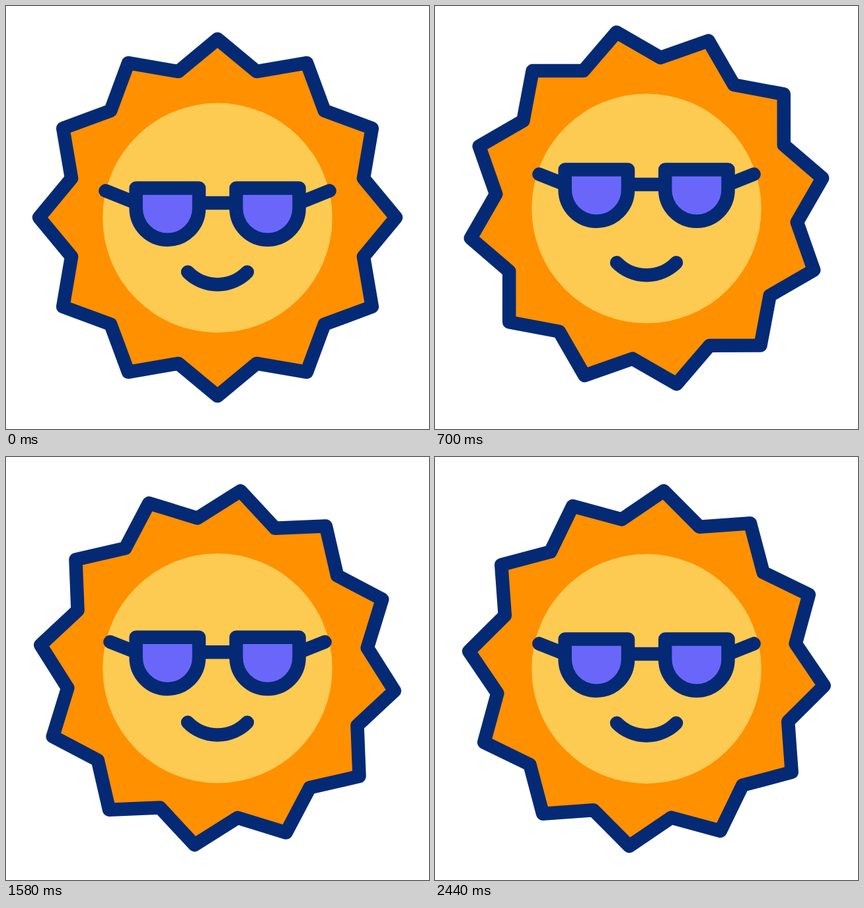
An HTML page that plays this animation: 640 px wide and 640 px high, repeating every 2.47 s.

```html
<!DOCTYPE html>
<html lang="en">
<head>
<meta charset="utf-8">
<title>Sun with sunglasses</title>
<style>
  html, body { margin: 0; width: 100%; height: 100%; overflow: hidden; background: #fff; }
  svg { display: block; width: 100%; height: 100%; }
  .line { stroke: #042a75; stroke-width: 20.5; stroke-linecap: round; stroke-linejoin: round; fill: none; }
</style>
</head>
<body>
<svg viewBox="0 0 640 640">
  <g id="body">
    <polygon id="rays" class="line" style="fill:#ff9000"/>
    <circle cx="320" cy="320.5" r="173.7" fill="#fdcb52"/>
    <path class="line" d="M275 402.5A63 63 0 0 0 365 402.5"/>
  </g>
  <g id="glasses" class="line">
    <path id="arms"/>
    <path d="M292 298H348"/>
    <path id="lens" fill="#6a66fa" d="M196.7 275.5H292V306a47.65 47.65 0 0 1-95.3 0Z"/>
    <use href="#lens" x="151.5"/>
  </g>
</svg>
<script>
const LOOP = 2470, STEPS = 65;
const STEP_STARTS = [30, 60, 130, 160]; // uneven step times, repeating every 190 ms
const $ = id => document.getElementById(id);

// Vertical bounce as [step, offset] extremes
const BODY = [[0, 0], [8, 21.3], [10.5, 20], [16, -18], [25, 12.5], [33.5, -9.3], [44, 0]];
const GLASSES = [[0, 0], [8.5, 41.5], [11, 39], [16.8, -30.5], [25.8, 21.8], [34.3, -18], [44.5, 0]];
const ARMS = [[0, 0], [8, 0], [16, 7]];

function ease(keys, step) {
  const i = keys.findIndex(key => key[0] > step);
  if (i < 0) return keys[keys.length - 1][1];
  const [t0, a] = keys[i - 1], [t1, b] = keys[i];
  const u = (step - t0) / (t1 - t0);
  return a + (b - a) * u * u * (3 - 2 * u);
}

const points = Array.from({ length: 24 }, (_, i) => {
  const radius = i % 2 ? 228.7 : 270, angle = i * Math.PI / 12;
  return [320 + radius * Math.sin(angle), 320 - radius * Math.cos(angle)];
});
$("rays").setAttribute("points", points.join(" "));

function draw(now) {
  const t = now % LOOP;
  const step = 5 * Math.floor(t / 190) + STEP_STARTS.filter(start => t % 190 >= start).length;
  const trim = ease(ARMS, step), tipY = 279.6 + trim * 0.4;

  $("rays").setAttribute("transform", `rotate(${-360 * step / STEPS} 320 320)`);
  $("body").setAttribute("transform", `translate(0 ${ease(BODY, step)})`);
  $("glasses").setAttribute("transform", `translate(0 ${ease(GLASSES, step)})`);
  $("arms").setAttribute("d", `M${150.5 + trim} ${tipY}L196.7 298M${489.5 - trim} ${tipY}L443.5 298`);
  requestAnimationFrame(() => draw(performance.now() - origin));
}
const origin = performance.now();
draw(0);
</script>
</body>
</html>
```
